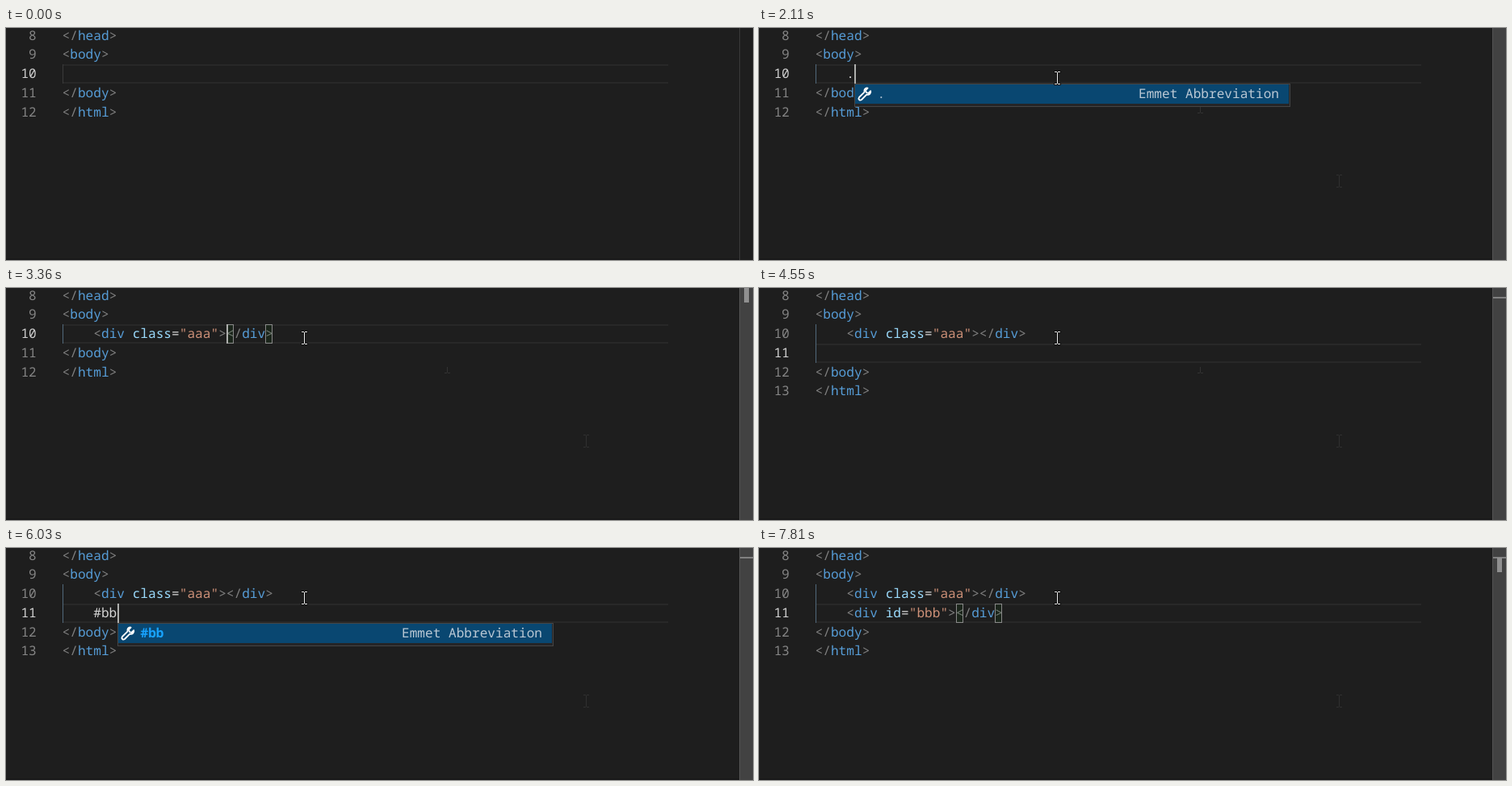
Write an HTML page with a canvas that moves like this. It is 925x288 px and loops after 8000 ms.

```html
<!DOCTYPE html>
<html>
<head>
<meta charset="utf-8">
<style>
html, body { margin: 0; width: 100%; height: 100%; overflow: hidden; background: #1e1e1e; }
canvas { display: block; }
</style>
</head>
<body>
<canvas id="stage" width="925" height="288"></canvas>
<script>
const ctx = document.getElementById('stage').getContext('2d');
const LOOP = 8000, LEFT = 70.06, CHAR = 9.68, ROW = 23.75;
const FONT = '16.13px "Noto Sans Mono", monospace';
const DIV_A = '<div class="aaa"></div>', DIV_B = '<div id="bbb"></div>';
const WRENCH = new Path2D('M12.6 1.6C9.5 1 7.6 3.6 8.5 6.6L2 13Q.8 14.6 2 16Q3.4 17.2 5 16' +
  'L11.3 9.6C14.6 10.5 17 8 16.2 5.2L13.4 8L11 7.2L10 4.5Z');

// time, edited lines, caret visible, rows in the suggestion list
const STATES = [
  [0, [''], 0, 0], [180, [''], 1, 0], [710, [''], 0, 0], [1240, [''], 1, 0], [1780, [''], 0, 0],
  [2110, ['.'], 1, 1], [2640, ['.'], 0, 1], [2730, ['.a'], 1, 1], [2815, ['.aa'], 1, 1],
  [2900, ['.aaa'], 1, 1], [3300, [DIV_A], 1, 0], [3820, [DIV_A], 0, 0],
  [4090, [DIV_A, ''], 1, 0], [4550, [DIV_A, ''], 0, 0],
  [4890, [DIV_A, '#'], 1, 3], [5360, [DIV_A, '#'], 0, 3], [5560, [DIV_A, '#b'], 1, 0],
  [6030, [DIV_A, '#bb'], 1, 1], [6220, [DIV_A, '#bbb'], 1, 1], [6690, [DIV_A, '#bbb'], 0, 1],
  [7220, [DIV_A, '#bbb'], 1, 1], [7350, [DIV_A, DIV_B], 1, 0], [7810, [DIV_A, DIV_B], 0, 0]
];
// time, x, y of the mouse
const MOUSE = [[130, 890, 277], [201, 718, 190], [272, 546, 103], [343, 452, 68],
  [485, 385, 61], [840, 371, 62], [1110, 370, 62], [1111, 369, 62]];

function rect(color, x, y, w, h) {
  ctx.fillStyle = color;
  ctx.fillRect(x, y, w, h);
}

function text(s, x, y, color, weight = 500) {
  ctx.font = `${weight} ${FONT}`;
  ctx.fillStyle = color;
  ctx.fillText(s, x, y);
}

const colX = col => Math.round(LEFT + col * CHAR);
const lineTop = n => Math.round(45 + (n - 10) * ROW);

function code(s, col, y) {
  let prev = '';
  for (const m of s.matchAll(/<\/?|>|"[^"]*"|=|[.#]\w*|\w+|\s+/g)) {
    const k = m[0];
    const color = /[<>]/.test(k) ? '#808080' : k[0] === '"' ? '#ce9178' :
      /[=.#]/.test(k) ? '#d4d4d4' : prev[0] === '<' ? '#569cd6' : '#9cdcfe';
    text(k, LEFT - 0.5 + (col + m.index) * CHAR, y, color);
    prev = k;
  }
}

function popup(x, y, typed, rows) {
  const h = Math.round(28.5 + (rows - 1) * ROW);
  rect('#454545', x, y, 540, h);
  rect('#252526', x + 1, y + 1, 538, h - 2);
  rect('#094771', x + 1, y + 1, 537, 24);
  ctx.save();
  ctx.translate(x + 4, y + 4);
  ctx.strokeStyle = '#fff';
  ctx.lineWidth = 1.8;
  ctx.lineJoin = 'round';
  ctx.stroke(WRENCH);
  ctx.restore();
  if (typed.length > 1) text(typed, x + 28.5, y + 18, '#18a3ff', 'bold');
  else text(typed, x + 28.5, y + 18, '#a9bfcf');
  text('Emmet Abbreviation', x + 352, y + 18, '#bac8d4');
  ['#endregion', '#region'].slice(0, rows - 1).forEach((label, i) => {
    const top = Math.round(y + (i + 1) * ROW);
    ctx.strokeStyle = '#c5c5c5';
    ctx.lineWidth = 1.5;
    ctx.strokeRect(x + 7, top + 6, 12, 12);
    text('#', x + 28.5, top + 18, '#18a3ff', 'bold');
    text(label.slice(1), x + 28.5 + CHAR, top + 18, '#d4d4d4');
  });
}

function beam(x, y, color, edge) {
  const parts = [[-3, -8, 3, 1], [1, -8, 3, 1], [0, -7, 1, 14], [-3, 7, 3, 1], [1, 7, 3, 1]];
  if (edge) for (const [a, b, w, h] of parts) rect(edge, x + a - 1, y + b - 1, w + 2, h + 2);
  for (const [a, b, w, h] of parts) rect(color, x + a, y + b, w, h);
}

function mouseAt(t) {
  if (t < 840) t = 130 + Math.floor((t - 130) / 71) * 71;
  const i = MOUSE.findIndex(p => p[0] > t);
  if (i < 0) return MOUSE[MOUSE.length - 1].slice(1);
  const [a, b] = [MOUSE[i - 1], MOUSE[i]], k = (t - a[0]) / (b[0] - a[0]);
  return [1, 2].map(j => Math.round(a[j] + (b[j] - a[j]) * k));
}

function draw(t) {
  const [, edited, caretOn, rows] = STATES.findLast(s => s[0] <= t);
  const current = 9 + edited.length, top = lineTop(current);
  const typed = edited[edited.length - 1];
  const inner = typed.indexOf('></') + 1;
  const caret = colX(4 + (inner || typed.length));

  rect('#1e1e1e', 0, 0, 925, 288);

  // faint trails left by the mouse
  if (t >= 272) beam(718, 190, '#303030');
  if (t >= 343 && t < 4890) {
    beam(546, 98, '#333');
    if (t >= 2110) rect('#1e1e1e', 542, 89, 9, 9);
  }

  rect('#282828', 70, top, 750, 2);
  rect('#282828', 70, top + 22, 750, 2);
  rect(t < 2110 ? '#3a3a3a' : '#51697a', 70, 45, 1, top - 45 + 24);

  const lines = ['</head>', '<body>', ...edited, '</body>', '</html>'];
  lines.forEach((s, i) => {
    const n = i + 8, y = Math.round(62 + (n - 10) * ROW);
    text(n, 37.8 - String(n).length * CHAR, y, n === current ? '#d0d0d0' : '#858585');
    code(s, n > 9 && n <= current ? 4 : 0, y);
  });

  if (inner) {
    for (const col of [inner + 4, typed.length + 3]) {
      const x = Math.floor(LEFT + col * CHAR);
      rect('rgba(0,100,0,.1)', x, top, 9, 24);
      ctx.strokeStyle = '#888';
      ctx.lineWidth = 1;
      ctx.strokeRect(x + 0.5, top + 0.5, 8, 23);
    }
  }
  if (caretOn) rect('#aeafad', caret, top, 2, 24);
  if (rows) popup(caret, top + 24, typed, rows);

  // overview ruler and scrollbar
  rect('#3a3a3a', 908, 0, 1, 288);
  if (t >= 4150) rect('rgba(160,160,160,.8)', 909, 11, 16, 2);
  if (inner) rect('#a0a0a0', 914, current === 11 ? 12 : 0, 6, 18);
  const fade = Math.min(1, Math.max(0, (t - 130) / 140));
  rect(`rgba(121,121,121,${0.4 * fade})`, 908, 0, 17, 288);
  rect('#19191a', 0, 286, 908, 2);

  if (t >= 130) beam(...mouseAt(t), '#f0f0f0', '#111');
}

ctx.textRendering = 'geometricPrecision';
function frame() {
  draw(performance.now() % LOOP);
  requestAnimationFrame(frame);
}
frame();
</script>
</body>
</html>
```
